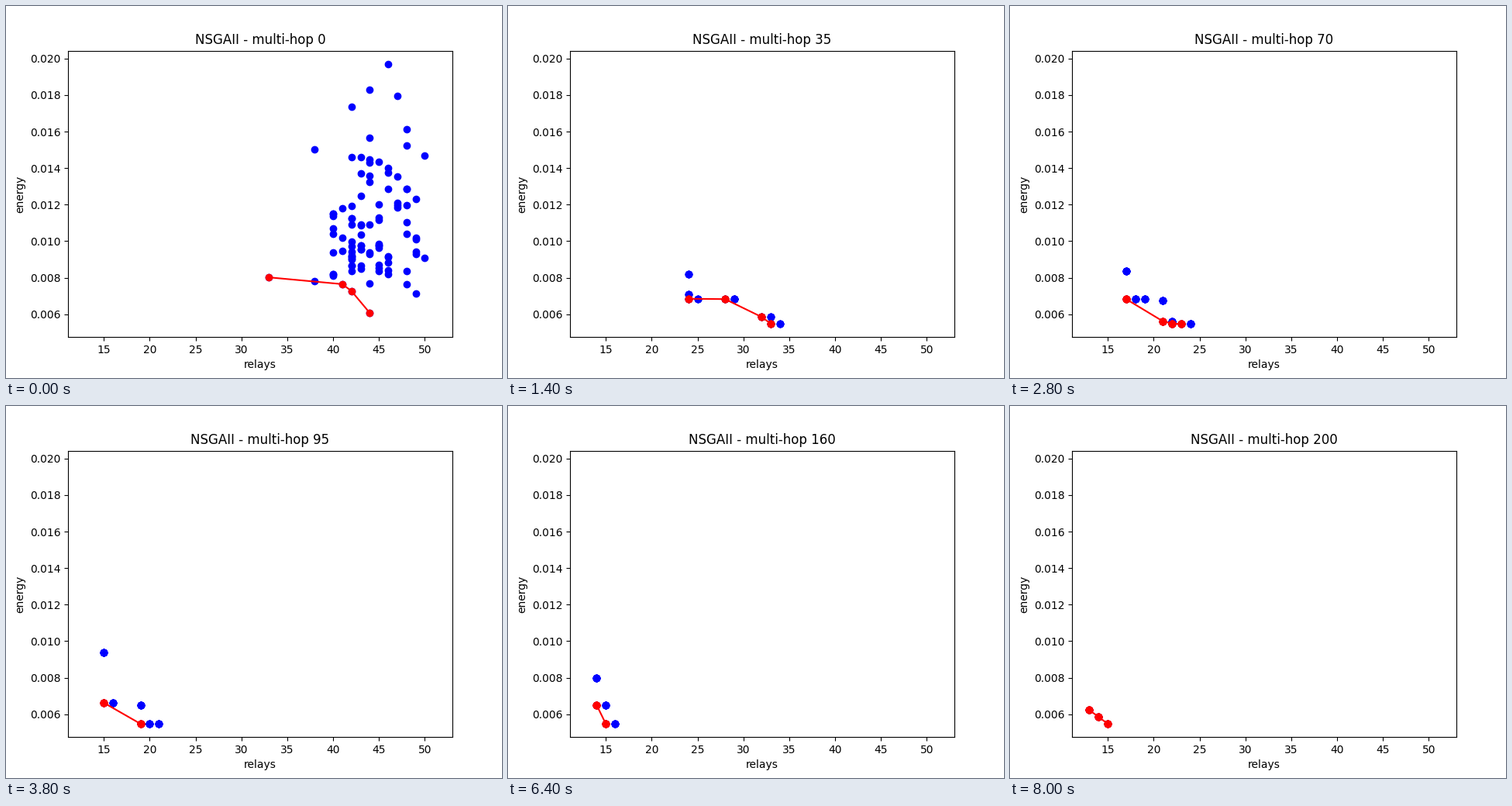
Recreate the animation shown at these times as a matplotlib script. Size 640 px wide and 480 px high, loop 8200 ms.

```python
import numpy as np
import matplotlib.pyplot as plt
from matplotlib.animation import FuncAnimation

STEP, LAST = 5, 200      # generations per frame, final generation
CONVERGED = 180          # from here on only the front survives
UNIT = 1e-4              # energies below are in units of 1e-4

# Pareto front at key generations: (relays, energy)
FRONTS = {
    0: [(33, 80.2), (41, 76.5), (42, 72.7), (44, 60.7)],
    15: [(26, 174.6), (28, 156.7), (29, 78.2), (31, 72.3), (33, 72.3),
         (35, 71), (38, 63), (39, 60.8), (42, 58.3)],
    35: [(24, 68.5), (28, 68.3), (32, 58.5), (33, 54.8)],
    70: [(17, 68.3), (21, 56.2), (22, 54.9), (23, 54.7)],
    95: [(15, 66.3), (19, 54.8)],
    160: [(14, 65.1), (15, 54.8)],
    180: [(13, 62.3), (15, 54.8)],
    190: [(13, 62.3), (14, 58.5), (15, 54.8)],
}
GENS = sorted(FRONTS)


def resample(points, n):
    pos = np.linspace(0, len(points) - 1, n)
    return np.array([np.interp(pos, range(len(points)), c) for c in zip(*points)])


def pareto(points):
    front, best = [], np.inf
    for x, e in sorted(points):
        if e < best:
            front.append((x, e))
            best = e
    return front


def front_at(gen):
    gen = min(gen, GENS[-1])
    if gen in FRONTS:
        return FRONTS[gen]
    lo = max(g for g in GENS if g < gen)
    hi = min(g for g in GENS if g > gen)
    n = max(len(FRONTS[lo]), len(FRONTS[hi]))
    t = (gen - lo) / (hi - lo)
    x, e = (1 - t) * resample(FRONTS[lo], n) + t * resample(FRONTS[hi], n)
    return pareto(zip(np.round(x), e))


def initial_cloud(front, gen, rng):
    """Wide random population that dies out over the first generations."""
    fx, fe = np.array(front).T
    n = round(95 * np.exp(-gen / 4))
    x = np.clip(np.round(rng.normal(fx.mean() + 3.8, 3, n)), fx[0] + 5, 51)
    e = np.clip(70 + rng.gamma(2.4, 19, n), 0, 197)
    keep = e > np.interp(x, fx, fe)
    return list(zip(x[keep], e[keep]))


def offspring(front, gen, rng):
    """Near copies of the front: more relays or a little more energy."""
    points = []
    for x, e in front:
        reach = rng.integers(1, 3) if gen < 120 else 1
        points += [(x + d, e) for d in range(1, reach + 1)]
        if rng.random() < 0.5:
            points.append((x + rng.integers(0, 2), e + rng.exponential(5)))
    x, e = front[0]
    points.append((x, min(e + rng.exponential(30), 197)))
    return points


def population(gen):
    rng = np.random.default_rng(gen)
    front = front_at(gen)
    rest = initial_cloud(front, gen, rng)
    if 0 < gen < CONVERGED:
        rest += offspring(front, gen, rng)
    return front, rest


def stack(points, copies):
    """Repeat points, as identical individuals pile up on one spot."""
    x, e = np.repeat(points, copies, axis=0).T
    return x, e * UNIT


fig, ax = plt.subplots(figsize=(6.4, 4.8), dpi=100)
ax.set(xlim=(11.1, 53), ylim=(0.0047515, 0.0204305), xlabel="relays", ylabel="energy")
title = ax.set_title("")
cloud_dots, = ax.plot([], [], "bo")
front_line, = ax.plot([], [], "ro-")


def draw(i):
    gen = i * STEP
    front, rest = population(gen)
    copies = min(1 + gen // 10, 8)
    cloud_dots.set_data(*stack(rest + front, copies))
    front_line.set_data(*stack(front, copies))
    title.set_text(f"NSGAII - multi-hop {gen}")
    return cloud_dots, front_line, title


anim = FuncAnimation(fig, draw, frames=LAST // STEP + 1, interval=200,
                     repeat=True, repeat_delay=0)
plt.show()
```
